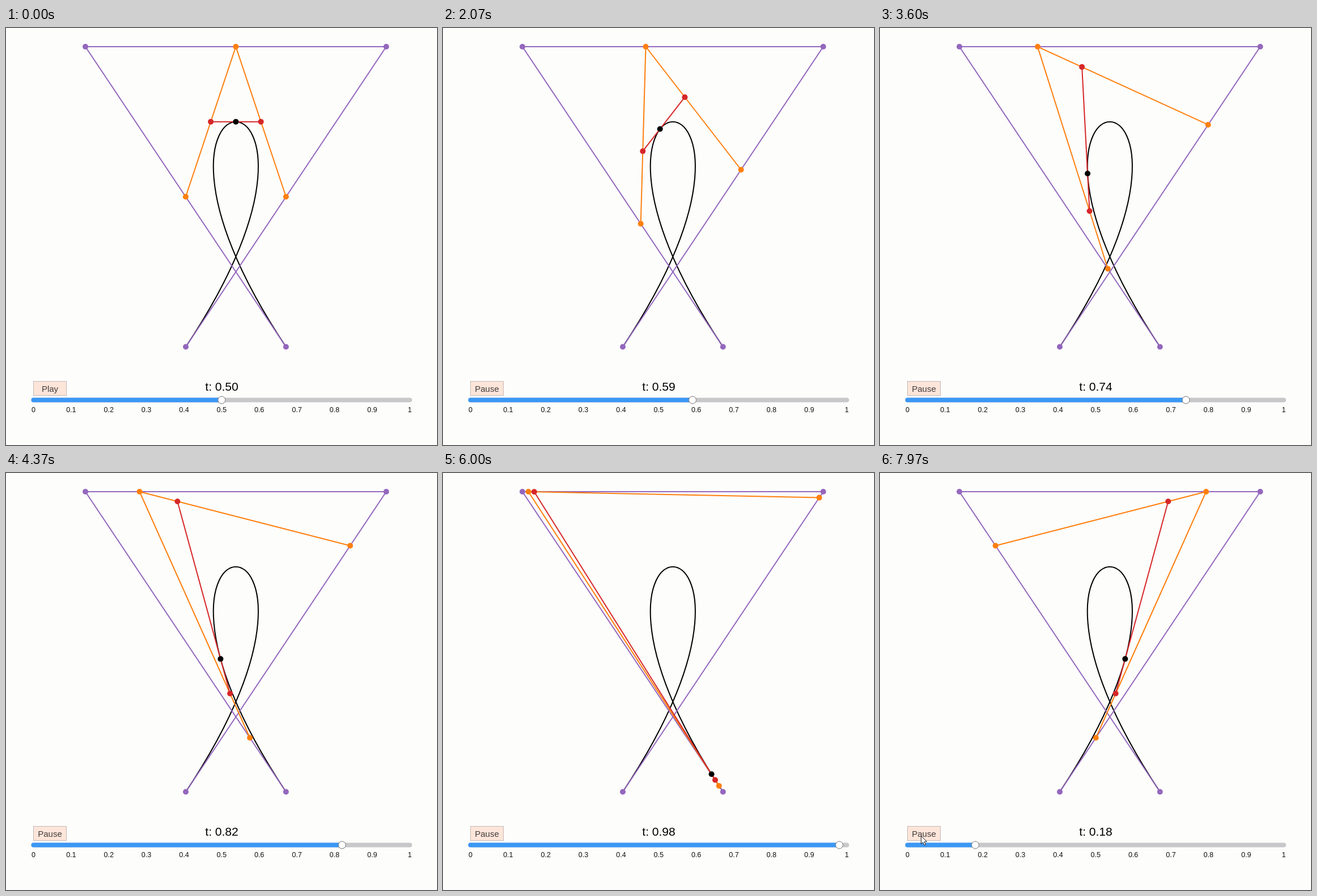
Animation of 760x737 px, one loop 8 s. Source, as an HTML page with a canvas:

```html
<!DOCTYPE html>
<html lang="en">
<head>
<meta charset="utf-8">
<title>Cubic curve construction</title>
<style>
  html, body { margin: 0; width: 100%; height: 100%; overflow: hidden; background: #fdfdfc; }
  canvas { display: block; }
</style>
</head>
<body>
<canvas id="stage" width="760" height="737"></canvas>
<script>
const ctx = document.getElementById('stage').getContext('2d');
const LOOP = 8000, PLAY_AT = 1140, STEP = 100;
const PURPLE = '#9467bd', ORANGE = '#ff7f0e', RED = '#d62728';
const CONTROLS = [[317, 563.5], [670.5, 33], [140, 33], [493.7, 563.5]];
const SLIDER = { x: 48.5, y: 657.5, width: 663.5 };

const lerp = (a, b, t) => a.map((v, i) => v + (b[i] - v) * t);
const reduce = (points, t) => points.slice(1).map((p, i) => lerp(points[i], p, t));

function line(points, color, width = 2) {
  ctx.beginPath();
  points.forEach(p => ctx.lineTo(...p));
  ctx.strokeStyle = color;
  ctx.lineWidth = width;
  ctx.stroke();
}

function dot([x, y], color, radius = 5) {
  ctx.beginPath();
  ctx.arc(x, y, radius, 0, 2 * Math.PI);
  ctx.fillStyle = color;
  ctx.fill();
}

function text(string, x, y, size, color = '#000') {
  ctx.font = `${size}px "Liberation Sans", Arial, sans-serif`;
  ctx.textAlign = 'center';
  ctx.fillStyle = color;
  ctx.fillText(string, x, y);
}

function drawConstruction(t) {
  const [a, b, c, d] = CONTROLS;
  ctx.beginPath();
  ctx.moveTo(...a);
  ctx.bezierCurveTo(...b, ...c, ...d);
  ctx.strokeStyle = '#000';
  ctx.lineWidth = 2;
  ctx.stroke();

  const second = reduce(CONTROLS, t), third = reduce(second, t), tip = reduce(third, t);
  const levels = [[CONTROLS, PURPLE], [second, ORANGE], [third, RED], [tip, '#000']];
  levels.forEach(([points, color]) => line(points, color));
  levels.forEach(([points, color]) => points.forEach(p => dot(p, color)));
}

function drawSlider(t) {
  const { x, y, width } = SLIDER;
  const thumb = x + width * t;
  ctx.lineCap = 'round';
  line([[x, y], [x + width, y]], '#c8c8ca', 8);
  line([[x, y], [thumb, y]], '#3b97f5', 8);
  ctx.lineCap = 'butt';
  dot([thumb, y], '#fff', 6.5);
  ctx.strokeStyle = '#777';
  ctx.lineWidth = 1;
  ctx.stroke();
  for (let i = 0; i <= 10; i++) text(String(i / 10), x + width * i / 10, 678.5, 12.5, '#111');
  text('t: ' + t.toFixed(2), 380.5, 641, 21);
}

function drawButton(label) {
  ctx.fillStyle = '#fde5da';
  ctx.fillRect(48, 624, 59, 26);
  ctx.strokeStyle = '#c5b8b5';
  ctx.lineWidth = 1;
  ctx.strokeRect(48.5, 624.5, 58, 25);
  text(label, 77.5, 643, 15, '#443c3a');
}

function drawCursor(time) {
  const progress = Math.min(1, (time - 7720) / 200);
  if (progress < 0) return;
  const [x, y] = lerp([92, 737], [72.5, 641.5], 1 - (1 - progress) ** 2);
  const outline = [[0, 0], [0, 14], [3.2, 11], [5.7, 16.5], [8, 15.5], [5.6, 10.2], [10, 10]];
  ctx.beginPath();
  outline.forEach(([dx, dy]) => ctx.lineTo(x + dx, y + dy));
  ctx.closePath();
  ctx.fillStyle = '#fff';
  ctx.fill();
  ctx.strokeStyle = '#222';
  ctx.lineWidth = 1;
  ctx.stroke();
}

function draw(time) {
  const playing = time >= PLAY_AT;
  const steps = playing ? Math.floor((time - PLAY_AT) / STEP) : 0;
  const t = (50 + steps) % 100 / 100;
  ctx.fillStyle = '#fdfdfc';
  ctx.fillRect(0, 0, 760, 737);
  drawConstruction(t);
  drawButton(playing ? 'Pause' : 'Play');
  drawSlider(t);
  drawCursor(time);
}

const start = performance.now();
function frame() {
  draw((performance.now() - start) % LOOP);
  requestAnimationFrame(frame);
}
frame();
</script>
</body>
</html>
```
